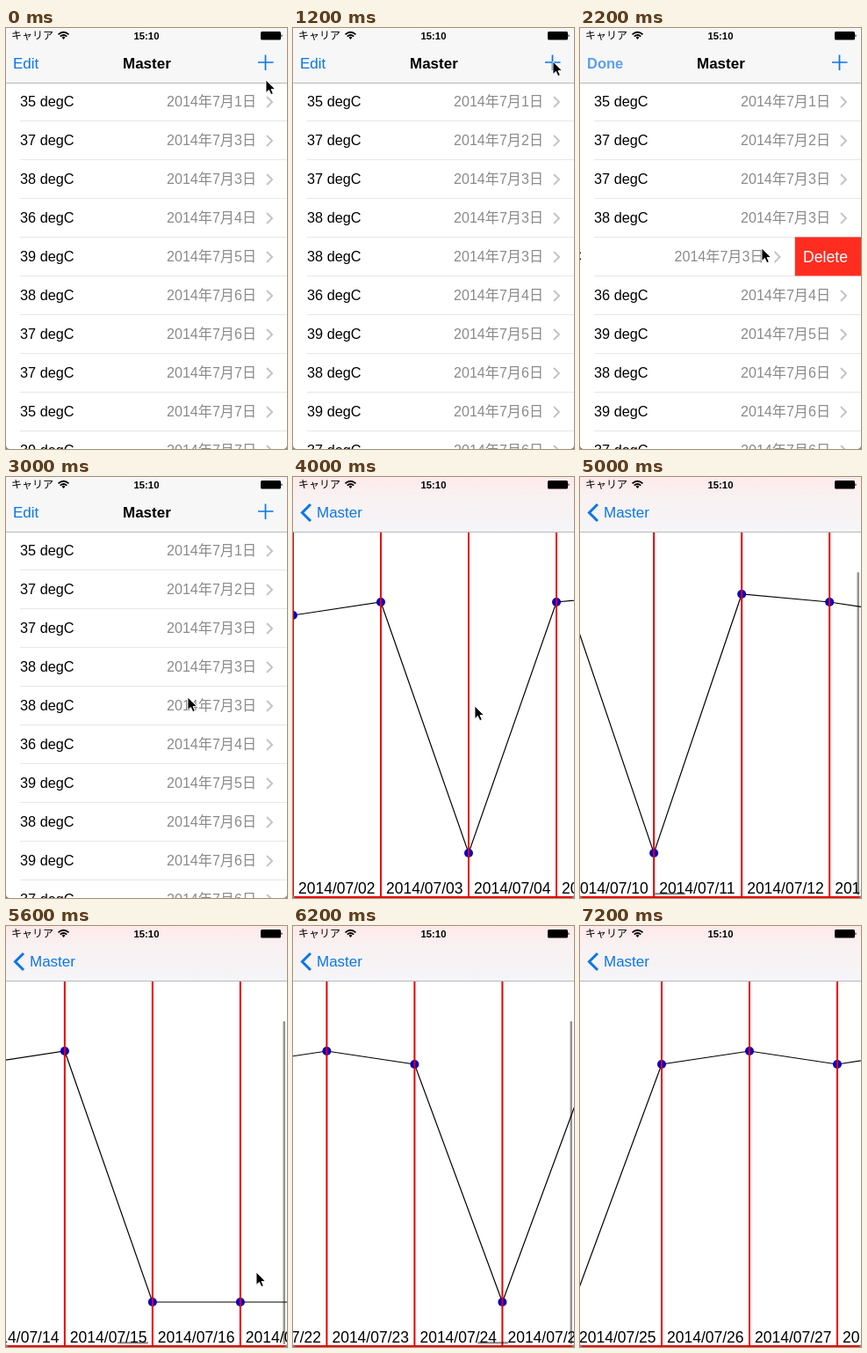
Recreate the animation shown at these times as an HTML page. Size 320 px wide and 478 px high, loop 7400 ms.

```html
<!DOCTYPE html>
<html lang="ja">
<head>
<meta charset="utf-8">
<title>Temperature log</title>
<style>
html, body { margin: 0; width: 100%; height: 100%; overflow: hidden; background: #fff; }
svg { display: block; width: 320px; height: 478px; font: 16.3px "Liberation Sans", "Noto Sans CJK JP", sans-serif; }
.nav { font-size: 17px; fill: #0b76e8; }
.blue { stroke: #0b76e8; }
.title { font-weight: bold; fill: #000; }
.date { font-size: 16.1px; fill: #8a8a8c; text-anchor: end; }
.line { fill: none; }
#done { font-weight: bold; font-size: 16.5px; }
</style>
</head>
<body>
<svg viewBox="0 0 320 478">
  <defs>
    <linearGradient id="tint" x2="0" y2="1">
      <stop offset="0" stop-color="#ffe9e9"/>
      <stop offset=".35" stop-color="#f9f1f2"/>
      <stop offset="1" stop-color="#f5f5f7"/>
    </linearGradient>
  </defs>
  <rect width="320" height="478" fill="#fff"/>
  <g id="list"></g>
  <g id="graph">
    <rect width="320" height="478" fill="#fff"/>
    <g id="plot"></g>
    <path class="line" d="M0 477H320" stroke="#e60000" stroke-width="2"/>
    <g id="bars" fill="#000" fill-opacity=".42">
      <rect x="315.5" y="108" width="2.5" height="367" rx="1.2"/>
      <rect id="thumb" y="472" width="35" height="2.5" rx="1.2"/>
    </g>
  </g>
  <rect width="320" height="62" fill="#f7f7f7"/>
  <rect id="pink" width="320" height="62" fill="url(#tint)"/>
  <path class="line" d="M0 62.5H320" stroke="#b8b8ba"/>
  <g class="nav">
    <g id="front">
      <text id="edit" x="8" y="46">Edit</text>
      <text id="done" x="8" y="46">Done</text>
      <path class="line blue" d="M287 39H304.500M295.500 30.500V48" stroke-width="1.700"/>
    </g>
    <text id="title" class="title" x="133" y="46">Master</text>
    <g id="back">
      <path class="line blue" d="M20 31L10.500 40.500L20 50" stroke-width="3"/>
      <text id="backText" x="27" y="46">Master</text>
    </g>
  </g>
  <text x="6" y="13" font-size="12">キャリア</text>
  <path class="line" d="M59.500 7.300Q65.500 2.200 71.500 7.300M61.700 9.600Q65.500 6.400 69.300 9.600" stroke="#000" stroke-width="1.700"/>
  <path d="M63.500 10.800L65.500 9.600L67.500 10.800L65.500 13Z"/>
  <text x="160" y="13" font-size="11.300" font-weight="bold" text-anchor="middle">15:10</text>
  <rect x="290" y="4" width="23" height="9.500" rx="1.500"/>
  <path d="M313.500 7.200Q315.800 8.700 313.500 10.300Z"/>
  <path d="M0 474Q.5 477.500 4 478H0ZM320 474Q319.500 477.500 316 478H320Z" fill="#888"/>
  <path id="cursor" d="M0 0V14.500L3.400 11.400L5.800 16.600L8.300 15.500L6 10.500H10.500Z" stroke="#fff" stroke-width=".9"/>
</svg>
<script>
const LOOP = 7400, STEP = 200, ROW = 44, TOP = 62, DAY = 100, SWIPED = 4;
const $ = id => document.getElementById(id);
const lerp = (a, b, p) => a + (b - a) * p;
const ramp = (t, a, b) => Math.max(0, Math.min(1, (t - a) / (b - a)));
const smooth = p => p * p * (3 - 2 * p);
const easeOut = (p, power) => 1 - (1 - p) ** power;
const move = (el, x, y = 0) => el.setAttribute('transform', `translate(${x} ${y})`);
const fade = (el, a) => el.setAttribute('opacity', a);

// degrees for each day of the week
const week = [[35], [37], [37, 38, 38], [36], [39], [38, 39, 37], [37, 35, 39]];
const added = [4, 8, 1];
$('list').innerHTML = week.flatMap((temps, i) => temps.map(deg => `<g>
  <path class="line" d="M16 43.5H320" stroke="#cfced2"/>
  <rect id="button" x="244.5" y="-.5" width="76" height="44.5" fill="#ff2d20"/>
  <text x="279.5" y="28" font-size="17.6" fill="#fff" text-anchor="middle">Delete</text>
  <g><rect y="-.5" width="320" height="43.5" fill="#fff"/>
    <text x="16" y="27.3">${deg} degC</text>
    <text class="date" x="285" y="27.3">2014年7月${i + 1}日</text>
    <path class="line" d="M297 16L303 22L297 28" stroke="#c4c4c8" stroke-width="2"/></g>
  </g>`.replace(' id="button"', ''))).join('');
const cells = [...$('list').children];
cells.forEach((cell, i) => {
  if (i !== SWIPED) cell.querySelectorAll(':scope > rect, :scope > text').forEach(el => el.remove());
});
const swipe = cells[SWIPED].querySelector('g');

// readings alternate daily, lower on the chart in calm weeks; missing days drop to the floor
const missing = i => i % 7 === 2 || i === 14 || i === 15;
const heightOf = i => missing(i) ? 427 : i % 2 ? 142 : i > 3 && i < 11 ? 133 : 157;
const points = Array.from({ length: 30 }, (_, i) => ({ x: i * DAY, y: heightOf(i), day: i + 2 }));
$('plot').innerHTML =
  `<polyline class="line" stroke="#000" stroke-width="1.2" points="${points.map(p => `${p.x},${p.y}`).join(' ')}"/>` +
  points.map(({ x, y, day }) => `<circle cx="${x}" cy="${y}" r="5" fill="#0000c4"/>
    <path class="line" d="M${x} 0V477" stroke="#e60000" stroke-width="2"/>
    <text x="${x + 6}" y="473" font-size="17.5">2014/07/${String(day).padStart(2, '0')}</text>`).join('');

// time, x, y
const path = [
  [0, 296, 59], [400, 296, 38], [1200, 296, 38], [1600, 282, 250], [2000, 207, 250],
  [3600, 207, 250], [4000, 207, 260], [4300, 207, 300], [4800, -20, 310],
  [5000, -20, 320], [5600, 285, 393], [6100, -20, 393], [LOOP, -20, 393]
];
function cursorAt(t) {
  const i = path.findIndex(k => k[0] > t);
  const a = path[i - 1], b = path[i], p = ramp(t, a[0], b[0]);
  return [lerp(a[1], b[1], p), lerp(a[2], b[2], p)];
}

// two drags, each followed by a decelerating fling
const fling = t => 1413 - 1329 * Math.exp((4600 - t) / 500);
function scrollAt(t) {
  if (t < 4600) return 84 * ramp(t, 4400, 4600);
  if (t < 5700) return fling(t);
  const grab = fling(5700), release = grab + 164;
  if (t < 5900) return lerp(grab, release, ramp(t, 5700, 5900));
  return lerp(release, 2307, easeOut(ramp(t, 5900, 7000), 4));
}

function drawList(t) {
  let y = TOP;
  cells.forEach((cell, i) => {
    const born = 350 + 250 * added.indexOf(i);
    const p = added.includes(i) ? smooth(ramp(t, born, born + 300)) : 1;
    move(cell, 0, y - ROW * (1 - p));
    fade(cell, p);
    y += ROW * p;
  });
  const open = smooth(ramp(t, 1600, 2000)) - smooth(ramp(t, 2400, 2750));
  move(swipe, -75.5 * open);
  swipe.firstElementChild.setAttribute('fill', t >= 3200 ? '#d9d9d9' : '#fff');
  cells[SWIPED].querySelectorAll(':scope > rect, :scope > text').forEach(el => fade(el, open > 0 ? 1 : 0));

  const done = ramp(t, 2000, 2300) - ramp(t, 2500, 2800);
  fade($('done'), done);
  fade($('edit'), done > 0 ? 0 : 1);
}

function drawPush(t) {
  const push = easeOut(ramp(t, 3250, 3750), 3);
  move($('list'), -96 * push);
  move($('graph'), 320 * (1 - push));
  fade($('graph'), push > 0 ? 1 : 0);
  for (const id of ['front', 'title']) fade($(id), 1 - push);
  for (const id of ['back', 'pink']) fade($(id), push);
  move($('title'), -106 * push);
  move($('backText'), 106 * (1 - push));
}

function drawGraph(t) {
  const offset = scrollAt(t);
  move($('plot'), -offset);
  $('thumb').setAttribute('x', 3 + offset * 0.1005);
  fade($('bars'), ramp(t, 4350, 4450) - ramp(t, 7000, 7200));
}

const start = performance.now();
function tick() {
  const now = (performance.now() - start) % LOOP;
  const t = Math.floor(now / STEP) * STEP;
  drawList(t);
  drawPush(t);
  drawGraph(t);
  move($('cursor'), ...cursorAt(t));
  requestAnimationFrame(tick);
}
tick();
</script>
</body>
</html>
```
